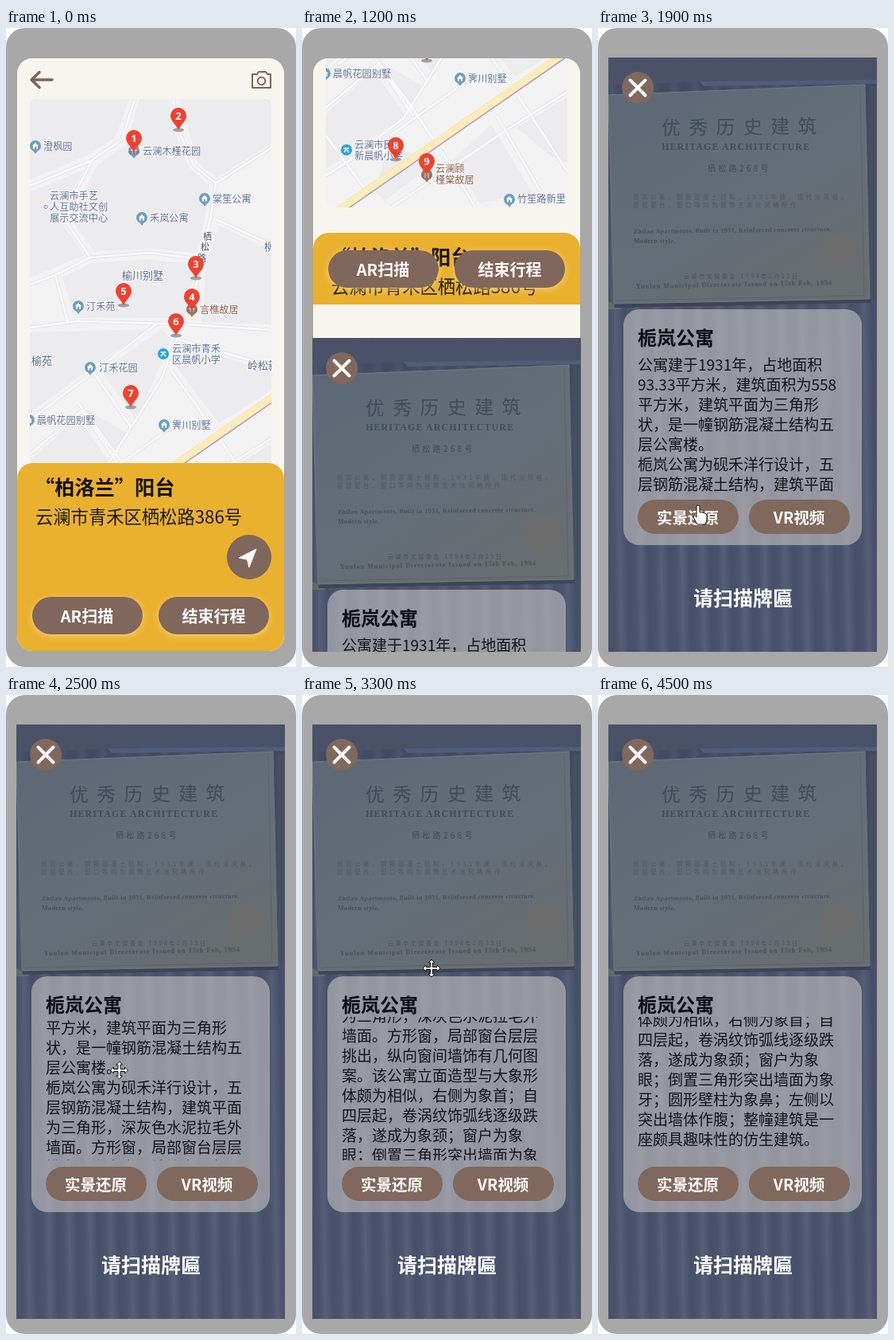
An HTML page for the animation above (5100 ms loop, 365x802 px).

```html
<!DOCTYPE html>
<html lang="zh-CN">
<head>
<meta charset="utf-8">
<title>城市漫步</title>
<style>
html, body { margin: 0; width: 100%; height: 100%; overflow: hidden; background: #fff; }
svg { display: block; width: 100vw; height: 100vh; }
text { font-family: "Noto Sans CJK SC", "Noto Sans CJK", "Noto Sans", sans-serif; }
.poi { font-size: 12.2px; fill: #66759a; paint-order: stroke; stroke: #f6f6f7; stroke-width: 2px; }
.brown { fill: #8d5f4a; }
.area { font-size: 13px; fill: #5f6b88; }
.road { font-size: 11px; fill: #555; }
.pin { font: bold 13px "Open Sans", "Noto Sans", sans-serif; fill: #fff; text-anchor: middle; }
.button { font-size: 20px; font-weight: bold; fill: #fff; text-anchor: middle; }
.glow { filter: drop-shadow(0 2px 4px rgba(255, 222, 150, .7)); }
.body { font-size: 19px; font-weight: 300; fill: #14151a; }
.plaque text { fill: #434a5b; }
.plaque .small { fill: #544f58; }
.plaque .latin { font-family: "Liberation Serif", "Noto Serif", serif; font-weight: bold; }
</style>
</head>
<body>
<svg viewBox="0 0 365 802" xmlns="http://www.w3.org/2000/svg">
<defs>
  <clipPath id="panel"><rect x="14" y="38" width="336" height="744" rx="19"/></clipPath>
  <clipPath id="screen"><rect x="13" y="37" width="338" height="746"/></clipPath>
  <clipPath id="pageArea"><rect x="14" y="38" width="336" height="744"/></clipPath>
  <clipPath id="mapArea"><rect x="30" y="89" width="304" height="571" rx="7"/></clipPath>
  <clipPath id="textArea"><rect x="48" y="404" width="262" height="180"/></clipPath>
  <linearGradient id="fold">
    <stop stop-color="#465069"/><stop offset=".35" stop-color="#4b546b"/>
    <stop offset=".62" stop-color="#566079"/><stop offset="1" stop-color="#465069"/>
  </linearGradient>
  <pattern id="folds" width="26" height="800" patternUnits="userSpaceOnUse" patternTransform="skewX(1)">
    <rect width="26" height="800" fill="url(#fold)"/>
  </pattern>
  <linearGradient id="shade" x2="0" y2="1">
    <stop stop-color="#343d52" stop-opacity=".4"/><stop offset=".5" stop-color="#465069" stop-opacity=".1"/>
    <stop offset="1" stop-color="#465069" stop-opacity=".1"/>
  </linearGradient>
  <linearGradient id="metal" x2=".7" y2="1">
    <stop stop-color="#5c6878"/><stop offset=".55" stop-color="#636e77"/><stop offset="1" stop-color="#686d70"/>
  </linearGradient>

  <g id="house"><path d="M-3.500 5L0 10 3.500 5Z"/><circle r="7"/><path d="M-4 0L0-4 4 0H3V3.500H1V1H-1V3.500H-3V0Z" fill="#fff"/></g>
  <g id="school"><circle r="7"/><path d="M-3.500-2H3.500M-3 3L0-1 3 3" fill="none" stroke="#fff" stroke-width="1.400"/></g>
  <g id="marker">
    <ellipse cy="18" rx="7" ry="2.500" fill="#777" opacity=".65"/>
    <path d="M0 18C-3 11-10 7-10 0A10 10 0 0 1 10 0C10 7 3 11 0 18Z" fill="#f2402f"/>
  </g>
  <g id="streets" fill="none" stroke-linejoin="round">
    <path d="M334 150L264 195 258 235 245 295 236 340 215 390 196 440 128 548 60 600"/>
    <path d="M210 89L217 128 236 172 264 195M30 198L108 166 146 140 162 89M30 376L90 368 230 372 334 379"/>
    <path d="M30 322L62 310 106 288 180 282 246 290M62 310L78 370M30 492L110 432 190 371M108 166L72 238 106 288"/>
    <path d="M264 240L334 272M215 390L334 425M140 545L96 480 30 535M110 432L158 502M334 515L262 560 176 618 112 660"/>
    <path d="M92 472L135 530 180 596 218 660M208 430L262 505 334 615M30 620L108 572 210 500M245 545L300 640M30 570L85 645"/>
  </g>
</defs>

<rect width="365" height="802" rx="24" fill="#a8a8a8"/>

<g clip-path="url(#panel)">
  <rect x="14" y="38" width="336" height="744" fill="#f7f5ef"/>
  <g id="mapPage">
    <g fill="none" stroke="#7f645a" stroke-linejoin="round" stroke-linecap="round">
      <path d="M58 65H32M42 55.500L32 65 42 74.500" stroke-width="3.500"/>
      <path d="M310 58H316L318 55H327L329 58H333V75H310Z" stroke-width="2"/>
      <circle cx="321.500" cy="66.500" r="4.800" stroke-width="2"/>
    </g>
    <g clip-path="url(#mapArea)">
      <rect x="30" y="89" width="304" height="571" fill="#f3f3f4"/>
      <path fill="#ececee" d="M168 89L204 89 212 130 231 175 255 198 252 232 240 283 182 276 112 281 80 238 116 171 152 146Z
        M30 89L155 89 138 137 102 160 30 190Z M218 89H334V145L266 187 242 170Z M30 206L98 178 66 238 98 285 30 314Z
        M86 364L71 313 108 295 180 290 238 297 228 364Z M30 382L180 378 104 428 30 484Z M196 378L208 390 187 440 164 492 120 431Z
        M268 248L334 279V372L246 369 252 297Z M220 397L334 431V455L268 496 214 425Z M100 478L152 508 136 535Z
        M30 543L90 488 130 545 30 612Z M190 600L238 556 290 642 224 655Z M270 560L334 522V604L312 595Z M110 580L165 605 104 652 92 640Z"/>
      <use href="#streets" stroke="#dfe0e4" stroke-width="4.600"/>
      <use href="#streets" stroke="#f9f9fa" stroke-width="3.200"/>
      <path d="M40 668L340 460.500" stroke="#efdfae" stroke-width="10"/>
      <path d="M40 667.500L340 460" stroke="#fdecb9" stroke-width="8.500"/>
      <path d="M40 674L340 466.500" stroke="#b39cbb" stroke-width="1.500"/>
      <circle cx="50" cy="224.500" r="2" fill="#fff" stroke="#7184b0"/>
      <g id="places"></g>
    </g>
    <g clip-path="url(#pageArea)">
      <g id="sheet">
        <rect x="14" y="546" width="336" height="237" rx="20" fill="#eab12f"/>
        <text x="36" y="586" font-size="25.200" font-weight="bold" fill="#14130f">“柏洛兰”阳台</text>
        <text x="37" y="622" font-size="22.300" font-weight="300" fill="#1c1a16">云澜市青禾区栖松路386号</text>
        <circle cx="306" cy="664" r="28" fill="#80675b"/>
        <path d="M293 665L315 654 306 677 303.500 667Z" fill="#fff" stroke="#fff" stroke-linejoin="round"/>
      </g>
    </g>
    <g class="glow" fill="#80675b">
      <rect x="33" y="714" width="139" height="47" rx="23.500"/>
      <rect x="192" y="714" width="139" height="47" rx="23.500"/>
    </g>
    <text class="button" x="102" y="746">AR扫描</text>
    <text class="button" x="261.500" y="746">结束行程</text>
  </g>
</g>

<g clip-path="url(#screen)">
  <g id="scanPage">
    <rect x="13" y="37" width="338" height="746" fill="url(#folds)"/>
    <rect x="13" y="37" width="338" height="746" fill="url(#shade)"/>
    <path d="M13 37H351V66L134 67 13 72Z" fill="#4b5368" opacity=".8"/>
    <path d="M128 67L351 65V70L133 73Z" fill="#515c79"/>
    <path d="M342 74H351V340H344Z" fill="#474f63"/>
    <path d="M13 343L30 353H13Z" fill="#5d6d68"/>
    <g class="plaque">
      <path d="M13 84L336 71 342 342 20 348Z" fill="#3c4456" transform="translate(1 3)"/>
      <path d="M13 84L336 71 342 340 20 346Z" fill="url(#metal)" stroke="#6f797f"/>
      <path d="M330 75L335 336 24 342" fill="none" stroke="#59636b"/>
      <ellipse cx="302" cy="280" rx="24" ry="21" fill="#716c68" opacity=".45"/>
      <text x="80" y="134" font-size="24" letter-spacing="10.300" transform="rotate(-.6 80 134)">优秀历史建筑</text>
      <text class="latin" x="80" y="153" font-size="12" letter-spacing="1.100">HERITAGE ARCHITECTURE</text>
      <text x="138" y="180" font-size="10" letter-spacing="3.300">栖松路268号</text>
      <g opacity=".8" font-size="7.500">
        <text class="small" x="44" y="215" letter-spacing="3.500">栀岚公寓，钢筋混凝土结构，1931年建，现代派风格。</text>
        <text class="small" x="44" y="225" letter-spacing="3.500">层层窗台、窗口等均为装饰艺术派风格所作</text>
        <text x="108" y="314" font-size="7" letter-spacing="2.600">云澜市文保委会 1994年2月15日</text>
      </g>
      <g opacity=".85" font-size="8">
        <text class="latin" x="45" y="258" letter-spacing=".45" transform="rotate(-.7 45 258)">Zhilan Apartments, Built in 1931, Reinforced concrete structure.</text>
        <text class="latin" x="45" y="270" letter-spacing=".45">Modern style.</text>
        <text class="latin" x="48" y="327" letter-spacing="1.100" transform="rotate(-1.100 48 327)">Yunlan Municipal Directorate Issued on 15th Feb, 1994</text>
      </g>
    </g>
    <circle cx="50" cy="75" r="20" fill="#80685d"/>
    <path d="M40.500 65.500L59.500 84.500M59.500 65.500L40.500 84.500" stroke="#fff" stroke-width="4" stroke-linecap="round"/>
    <rect x="32" y="353" width="300" height="296" rx="20" fill="#cecac8" fill-opacity=".57"/>
    <text x="50" y="398" font-size="24" font-weight="bold" fill="#0c1016">栀岚公寓</text>
    <g clip-path="url(#textArea)"><g id="story" class="body"></g></g>
    <g fill="#80685d">
      <rect x="50" y="592" width="127" height="43" rx="21.500"/>
      <rect x="190" y="592" width="127" height="43" rx="21.500"/>
    </g>
    <text class="button" x="113" y="621.500" style="font-size:19.500px">实景还原</text>
    <text class="button" x="253" y="621.500" style="font-size:19.500px">VR视频</text>
    <text class="button" x="182.500" y="724.500" style="font-size:25px">请扫描牌匾</text>
  </g>
</g>

<path id="cursor" fill="#fff" stroke="#111" stroke-linejoin="round"/>
</svg>

<script>
const $ = id => document.getElementById(id);

function add(parent, tag, attrs, text = '') {
  const node = document.createElementNS('http://www.w3.org/2000/svg', tag);
  for (const key in attrs) node.setAttribute(key, attrs[key]);
  node.textContent = text;
  parent.append(node);
}

const places = [
  { icon: '#house', fill: '#6f9fbe', at: [[37,148], [161,154], [250,214], [171,238], [91,349], [106,426], [29,492], [199,498], [261,650]] },
  { icon: '#school', fill: '#2aa5dc', at: [[198,409], [56,588]] },
  { icon: '#house', fill: '#a5715a', at: [[234,353], [157,619]] }
];
for (const { icon, fill, at } of places)
  for (const [x, y] of at) add($('places'), 'use', { href: icon, x, y, fill });

const labels = [
  [47,153,'澄枫园'], [172,159,'云澜木槿花园'],
  [55,215,'云澜市手艺'], [55,229,'人互助社文创'], [55,243,'展示交流中心'],
  [181,243,'禾岚公寓'], [260,219,'棠笙公寓'], [146,315,'榆川别墅','area'],
  [101,354,'汀禾苑'], [244,358,'言樵故居','brown'],
  [209,407,'云澜市青禾'], [209,421,'区晨帆小学'], [117,431,'汀禾花园'],
  [32,422,'榆苑','area'], [304,428,'岭松新','area'], [325,279,'柳','area'],
  [39,497,'晨帆花园别墅'], [209,503,'霁川别墅'],
  [66,586,'云澜市民办'], [66,600,'新晨帆小学'],
  [168,616,'云澜顾','brown'], [168,630,'槿棠故居','brown'], [271,654,'竹笙路新里'],
  [248,266,'栖','road'], [245,279,'松','road'], [241,293,'路','road']
];
for (const [x, y, text, kind = ''] of labels) add($('places'), 'text', { x, y, class: 'poi ' + kind }, text);

const pins = [[161,138], [217,110], [239,296], [234,337], [148,330], [214,368], [157,458], [118,582], [157,602]];
pins.forEach(([x, y], i) => {
  add($('places'), 'use', { href: '#marker', x, y });
  add($('places'), 'text', { x, y: y + 4.5, class: 'pin' }, i + 1);
});

const story = `公寓建于1931年，占地面积
93.33平方米，建筑面积为558
平方米，建筑平面为三角形
状，是一幢钢筋混凝土结构五
层公寓楼。
栀岚公寓为砚禾洋行设计，五
层钢筋混凝土结构，建筑平面
为三角形，深灰色水泥拉毛外
墙面。方形窗，局部窗台层层
挑出，纵向窗间墙饰有几何图
案。该公寓立面造型与大象形
体颇为相似，右侧为象首；自
四层起，卷涡纹饰弧线逐级跌
落，遂成为象颈；窗户为象
眼；倒置三角形突出墙面为象
牙；圆形壁柱为象鼻；左侧以
突出墙体作腹；整幢建筑是一
座颇具趣味性的仿生建筑。`;
story.split('\n').forEach((line, i) => add($('story'), 'text', { x: 50, y: 430 + i * 25 }, line));

const shapes = {
  arrow: 'M0 0V17L4 13 7 19.500 9.500 18.500 6.500 12H12Z',
  hand: 'M-2 1Q-2-1 0-1T2 1V8Q4 6.500 5.500 8.500 7 7.500 8.500 9.500 11 9 11 12V17L9 23H-1L-5.500 15Q-7 12-4.500 11.500L-2 14Z',
  beam: 'M-3-8H-1L0-7 1-8H3M-3 8H-1L0 7 1 8H3M0-7V7',
  move: 'M0-11L4-7H1.500V-1.500H7V-4L11 0 7 4V1.500H1.500V7H4L0 11-4 7H-1.500V1.500H-7V4L-11 0-7-4V-1.500H-1.500V-7H-4Z'
};

// Keys: tick (100 ms), then values.
const pointer = [[6,240,782], [7,192,768], [9,111,741], [10,111,741], [12,114,742], [16,128,602], [19,126,600],
  [21,138,509], [22,138,509], [28,147,433], [33,163,343], [34,165,322], [36,171,281], [37,174,271],
  [38,174,271], [41,190,253], [43,190,253], [44,320,178]];
const pointerKinds = [[6,'arrow'], [9,'hand'], [11,'beam'], [14,'hand'], [20,'move'], [44,'arrow'], [45,null]];
const scroll = [[22,0], [28,110], [33,195], [34,215], [36,255], [37,265], [38,265], [41,290]];

function sample(keys, tick) {
  const next = keys.findIndex(key => key[0] > tick);
  if (next < 0) return keys.at(-1).slice(1);
  if (next === 0) return keys[0].slice(1);
  const a = keys[next - 1], b = keys[next];
  const mix = (tick - a[0]) / (b[0] - a[0]);
  return a.slice(1).map((v, i) => v + (b[i + 1] - v) * mix);
}

const shift = (id, y) => $(id).setAttribute('transform', `translate(0 ${Math.round(y)})`);

function draw(now) {
  const tick = Math.floor(now % 5100 / 100);
  const k = Math.min(Math.max((tick - 10) / 6, 0), 1);
  const slide = 1 - (1 - k) ** 1.85;
  shift('mapPage', -825 * slide);
  shift('sheet', 277 * slide);
  shift('scanPage', 746 * (1 - slide));
  shift('story', -sample(scroll, tick)[0]);

  const kind = pointerKinds.findLast(key => key[0] <= tick)?.[1];
  const [x, y] = sample(pointer, tick);
  $('cursor').setAttribute('d', shapes[kind] || '');
  $('cursor').setAttribute('transform', `translate(${x} ${y})`);
  requestAnimationFrame(draw);
}
draw(performance.now());
</script>
</body>
</html>
```
